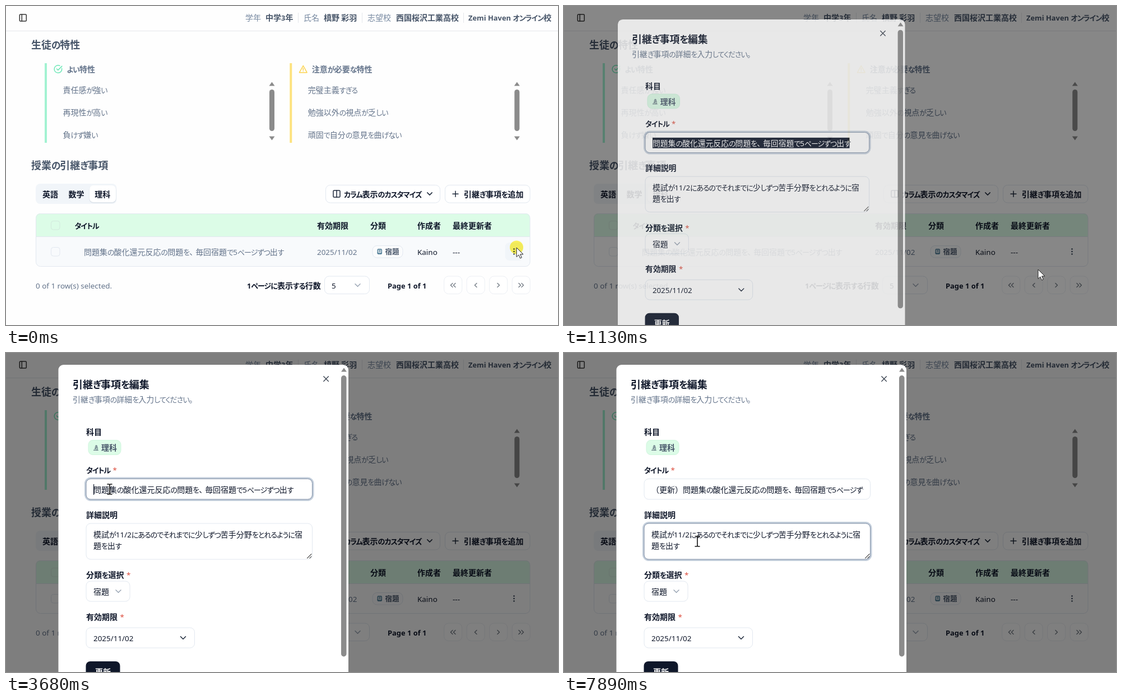
These frames come from a looping animation (985x569 px, 8 s). An HTML page:

```html
<!DOCTYPE html>
<html lang="ja">
<head>
<meta charset="utf-8">
<title>引継ぎ事項</title>
<style>
html, body { margin: 0; width: 100%; height: 100%; overflow: hidden; background: #fff; }
svg { display: block; width: 985px; height: 569px; }
text { white-space: pre; font-family: "Noto Sans CJK JP", "Noto Sans CJK", "Noto Sans", sans-serif; }
.kana { font-size: .93em; letter-spacing: -.075em; font-feature-settings: "palt", "kern"; }
.stop { letter-spacing: -.22em; }
.latin { font-family: "Noto Sans", "Open Sans", sans-serif; font-size: .96em; }
.bold .latin { font-size: .92em; }
</style>
</head>
<body>
<svg id="stage" viewBox="0 0 985 569" xml:space="preserve"></svg>
<script>
const LOOP = 8000;
const INK = '#0f172a', SLATE = '#64748b', DARK = '#475569', LINE = '#e2e8f0', MINT = '#dcfce7', BAR = '#8b8b8b';
const stage = document.getElementById('stage');

function el(tag, attrs, parent) {
  const node = document.createElementNS('http://www.w3.org/2000/svg', tag);
  for (const k in attrs) node.setAttribute(k, attrs[k]);
  parent.appendChild(node);
  return node;
}
const group = (parent, attrs = {}) => el('g', attrs, parent);
const show = (node, on) => node.setAttribute('display', on ? 'inline' : 'none');

// x1..y2 are the outer edges of the box
function box(g, x1, y1, x2, y2, r, fill, stroke, width = 1) {
  const o = stroke ? width / 2 : 0;
  return el('rect', {
    x: x1 + o, y: y1 + o, width: x2 - x1 - 2 * o, height: y2 - y1 - 2 * o, rx: r,
    fill: fill || 'none', stroke: stroke || 'none', 'stroke-width': width
  }, g);
}
function line(g, d, stroke, width = 1.4) {
  return el('path', {
    d, stroke, 'stroke-width': width, fill: 'none',
    'stroke-linecap': 'round', 'stroke-linejoin': 'round'
  }, g);
}
// cy is the middle of the line of text
function label(g, x, cy, str, fill = INK, bold = false, size = 14) {
  const t = el('text', { x, y: cy + size * .38, fill, 'font-size': size, 'font-weight': bold ? 600 : 400 }, g);
  if (bold) t.setAttribute('class', 'bold');
  for (const run of str.match(/[ぁ-ゖァ-ヺー]+|[、。]|[ -~]+|[^ぁ-ゖァ-ヺー、。 -~]+/g)) {
    const kind = /[ぁ-ゖァ-ヺー]/.test(run) ? 'kana' : /[、。]/.test(run) ? 'stop' : /[ -~]/.test(run) ? 'latin' : 'kanji';
    el('tspan', { class: kind }, t).textContent = run;
  }
  return t;
}
const chevron = (g, x, y, stroke, r = 4) => line(g, `M${x - r} ${y - r / 2}l${r} ${r}l${r} ${-r}`, stroke, 1.5);
const triangle = (g, x, y, dir) =>
  el('path', { d: `M${x - 5} ${y + 3.5 * dir}h10l-5 ${-7 * dir}z`, fill: BAR }, g);
const columns = (g, x, y, mid, stroke) => {
  el('rect', { x: x - 6, y: y - 6, width: 12, height: 12, rx: 1.5, fill: 'none', stroke, 'stroke-width': 1.5 }, g);
  line(g, `M${x + mid} ${y - 6}v12`, stroke, 1.5);
};

/* ---------- page ---------- */
const page = group(stage);
box(page, 0, 0, 985, 569, 0, '#fefefe');
columns(page, 30.3, 21, -2, '#333');
el('path', { d: 'M0 44.5H985', stroke: '#e5e7eb' }, page);
[[427, '学年', 463, '中学3年'], [531, '氏名', 567, '槙野 彩羽'], [645, '志望校', 696, '西国桜沢工業高校']].forEach(([x, a, x2, b]) => {
  label(page, x, 21, a, '#7688a0');
  label(page, x2, 21, b, DARK, true);
});
label(page, 825, 21, 'Zemi Haven オンライン校', DARK, true);
[521.5, 635.5, 816.5].forEach(x => el('path', { d: `M${x} 12V30`, stroke: '#e5e7eb' }, page));

label(page, 45, 69, '生徒の特性', DARK, true, 18);
function traits(x, color, title, items) {
  box(page, x, 102, x + 4, 244, 0, color);
  label(page, x + 39.5, 113, title, SLATE, true);
  items.forEach((s, i) => label(page, x + 32.5, 149.5 + i * 40.3, s, SLATE));
  box(page, x + 401, 149, x + 410, 223, 4.5, BAR);
  triangle(page, x + 405.5, 139, 1);
  triangle(page, x + 405.5, 236, -1);
}
traits(69, '#a3f2d2', 'よい特性', ['責任感が強い', '再現性が高い', '負けず嫌い']);
traits(506.3, '#fde27e', '注意が必要な特性', ['完璧主義すぎる', '勉強以外の視点が乏しい', '頑固で自分の意見を曲げない']);
line(page, 'M99.6 111.3a6.8 6.8 0 1 1-3.6-4.8M90.5 112l2.3 2.4l7-7', '#6ee7b7', 1.5);
line(page, 'M530.3 106.5l6.8 12.2h-13.6zM530.3 111v3.4M530.3 116.4v.2', '#fcd34d', 1.5);

label(page, 45, 284, '授業の引継ぎ事項', DARK, true, 18);
box(page, 53, 317, 197.5, 353, 8, '#f1f5f9');
box(page, 148.5, 321, 196.5, 351.5, 7, '#dde3ea');
box(page, 149, 320, 196, 350, 7, '#fff');
['英語', '数学', '理科'].forEach((s, i) => label(page, 65 + i * 46.6, 335.5, s, INK, true));

box(page, 570, 319, 775, 351.5, 8, '#fff', LINE);
columns(page, 590, 335, 0, '#1e293b');
label(page, 603, 335.5, 'カラム表示のカスタマイズ', INK, true);
chevron(page, 756, 335, '#1e293b', 4.2);
box(page, 783, 319, 935.5, 351.5, 8, '#fff', LINE);
line(page, 'M797 335.3h10M802 330.3v10', '#1e293b', 1.5);
label(page, 817, 335.5, '引継ぎ事項を追加', INK, true);

const rowHover = el('path', { d: 'M53.5 411H935V456q0 8-8 8H61.5q-8 0-8-8z', fill: '#f8fafc' }, page);
el('path', { d: 'M53.5 411V378q0-8 8-8H927q8 0 8 8V411z', fill: MINT }, page);
el('path', { d: 'M53.5 411.5H935', stroke: LINE }, page);
box(page, 53, 370, 935.5, 465, 8, null, LINE);
box(page, 80, 383, 96.5, 399.5, 4, null, '#d3e9dd');
box(page, 80, 430, 96.5, 446.5, 4, null, LINE);
[[122.5, 'タイトル'], [555, '有効期限'], [650, '分類'], [734, '作成者'], [797, '最終更新者']]
  .forEach(([x, s]) => label(page, x, 391.5, s, INK, true));
const TITLE = '問題集の酸化還元反応の問題を、毎回宿題で5ページずつ出す';
label(page, 139, 438.5, TITLE, SLATE);
label(page, 555, 438.5, '2025/11/02', SLATE);
box(page, 653.5, 427, 708.5, 449.5, 8, '#fbfcfd', LINE);
box(page, 662.5, 433, 671, 443, 1.5, null, '#4b7a94', 1.4);
line(page, 'M663 440.6h7.5M665.3 435.8h3M665.3 437.9h3', '#4b7a94', 1.2);
label(page, 676.5, 438.5, '宿題', DARK, true, 12.5);
label(page, 734, 438.5, 'Kaino');
label(page, 797, 438.5, '---');
const dotHover = box(page, 890.5, 422, 922.5, 454, 8, '#f1f5f9');
[433.5, 438, 442.5].forEach(cy => el('circle', { cx: 906.5, cy, r: 1.3, fill: '#334155' }, page));

label(page, 53, 498.5, '0 of 1 row(s) selected.', SLATE);
label(page, 430, 498.5, '1ページに表示する行数', INK, true);
box(page, 568, 481.5, 649, 514, 8, '#fff', LINE);
label(page, 581, 498.5, '5');
chevron(page, 627.5, 498, '#9aa5b4', 4.5);
label(page, 681, 498.5, 'Page 1 of 1', INK, true);
[[-1, 2], [-1, 1], [1, 1], [1, 2]].forEach(([dir, n], i) => {
  const x = 797.7 + i * 40.5;
  box(page, x - 16.5, 481.5, x + 16.5, 514, 8, '#fff', '#eceff4');
  for (let k = 0; k < n; k++) {
    const tip = x + dir * 1.8 + (n > 1 ? (k ? 2.5 : -2.5) : 0);
    line(page, `M${tip - dir * 3.6} 494.4l${dir * 3.6} 3.6l${-dir * 3.6} 3.6`, '#777f88', 1.4);
  }
});

/* ---------- row menu ---------- */
const menu = group(stage);
box(menu, 793, 458.5, 923, 542, 8, '#00000012');
box(menu, 794, 458, 922, 539, 7, '#fff', LINE);
box(menu, 799, 463, 917, 494, 5, '#f1f5f9');
label(menu, 807, 478.5, '編集');
el('path', { d: 'M795 498.5H921', stroke: LINE }, menu);
label(menu, 807, 518.5, '削除');

/* ---------- dialog ---------- */
const shade = box(stage, 0, 0, 985, 569, 0, '#000');
const dialog = group(stage);
box(dialog, 93.5, 21, 611, 621, 9, '#fff');
triangle(dialog, 603, 30, 1);
box(dialog, 598, 40, 607.5, 541.5, 4.7, BAR);
line(dialog, 'M566.8 41.8l8.6 8.6M575.4 41.8l-8.6 8.6', '#3f4754', 1.4);
label(dialog, 119, 56.5, '引継ぎ事項を編集', INK, true, 18);
label(dialog, 119, 83, '引継ぎ事項の詳細を入力してください。', SLATE);

[[141, '科目'], [209, 'タイトル', 190.5], [288.5, '詳細説明'], [396, '分類を選択', 215], [470.5, '有効期限', 203.5]].forEach(([y, s, star]) => {
  label(dialog, 143, y, s, INK, true);
  if (star) label(dialog, star, y, '*', '#dc4a3a');
});
box(dialog, 146.5, 155, 205.5, 182, 8, MINT, '#d0f5de');
line(dialog, 'M156.5 173.3h8M158 171h3M162 173a3.6 3.6 0 0 0 0-6M159.2 168.8l1.2-4l2 .6l-1.2 4z', DARK, 1);
label(dialog, 170, 169, '理科', DARK, true);

function field(y1, y2) {
  box(dialog, 142.5, y1, 547, y2, 8, '#fff', LINE);
  const ring = group(dialog);
  box(ring, 140, y1 - 2.5, 549.5, y2 + 2.5, 10, null, '#c3cedb', 3);
  box(ring, 142.5, y1, 547, y2, 8, null, '#8593a8');
  return ring;
}
const titleRing = field(224, 261.5);
const noteRing = field(303.5, 368.5);

const defs = el('defs', {}, stage);
const clip = id => el('rect', { x: 156, y: 226, width: 378, height: 34 }, el('clipPath', { id }, defs));
clip('inner');
const selClip = clip('selected');
const input = group(dialog, { 'clip-path': 'url(#inner)' });
const texts = ['', '（更新）'].map(prefix => {
  const g = group(input);
  label(g, 156, 243.5, prefix + TITLE);
  return g;
});
const selBox = box(input, 156, 234, 511, 253, 0, INK);
const selTexts = ['', '（更新）'].map(prefix => {
  const g = group(input, { 'clip-path': 'url(#selected)' });
  label(g, 156, 243.5, prefix + TITLE, '#fff');
  return g;
});
const caret = box(dialog, 156, 234, 157.2, 253, 0, INK);

label(dialog, 156, 323.5, '模試が11/2にあるのでそれまでに少しずつ苦手分野をとれるように宿');
label(dialog, 156, 343.5, '題を出す');
line(dialog, 'M537.5 366l7.5-7.5M541.8 366l3.2-3.2', '#555', 1.1);
box(dialog, 142.5, 406.5, 221.5, 443.5, 8, '#fff', LINE);
label(dialog, 156, 425.5, '宿題');
chevron(dialog, 200.5, 425, '#9aa5b4', 4.5);
box(dialog, 142.5, 489.5, 337, 526.5, 8, '#fff', LINE);
label(dialog, 156, 508.5, '2025/11/02');
chevron(dialog, 316, 508, '#1e293b', 4.5);
box(dialog, 142.5, 550, 203.5, 586, 8, INK);
label(dialog, 159, 568.5, '更新', '#fff', true);

/* ---------- pointer ---------- */
const glow = el('circle', { cx: 911, cy: 430.5, r: 12, fill: '#fff45c', style: 'mix-blend-mode: multiply' }, stage);
const pointer = group(stage);
const arrow = el('path', {
  d: 'M0 0V16.5L3.9 12.9L6.5 18.9L9.2 17.7L6.6 11.9H12Z',
  fill: '#fff', stroke: '#222', 'stroke-width': 1, 'stroke-linejoin': 'round'
}, pointer);
const beam = group(pointer);
const beamPath = 'M-4 -9h2.5q1.5 0 1.5 1.5v15q0 1.5 -1.5 1.5h-2.5M4 -9h-2.5q-1.5 0 -1.5 1.5M4 9h-2.5q-1.5 0 -1.5 -1.5';
line(beam, beamPath, '#111', 1.6);

/* ---------- motion ---------- */
const PATH = [
  [0, 911, 431], [200, 911, 431], [660, 853, 470], [990, 853, 470], [1060, 851, 470], [1130, 846, 470],
  [1680, 143, 264], [1750, 136, 250], [1820, 129, 237], [1960, 129, 237], [2580, 178, 243], [2740, 178, 243],
  [3200, 146, 238], [3420, 146, 238], [3540, 162, 241], [3680, 185, 243], [3800, 185, 243], [4030, 130, 247],
  [4150, 130, 247], [4510, 225, 243], [4880, 225, 243], [5600, 80, 233], [5799, 80, 233], [5800, 87, 231],
  [6270, 87, 231], [6330, 88, 270], [6680, 180, 331], [6900, 180, 331], [7080, 152, 331], [7250, 152, 331],
  [7620, 238, 336], [LOOP, 238, 336]
];
const clamp = v => Math.max(0, Math.min(1, v));
const smooth = v => v * v * (3 - 2 * v);
const within = (t, a, b) => t >= a && t < b;

function pointerAt(t) {
  let i = 1;
  while (PATH[i][0] < t) i++;
  const [t0, x0, y0] = PATH[i - 1], [t1, x1, y1] = PATH[i];
  const k = smooth(clamp((t - t0) / (t1 - t0)));
  return [x0 + (x1 - x0) * k, y0 + (y1 - y0) * k];
}
// cubic-bezier(.25, .1, .25, 1)
function ease(v) {
  const bez = (u, a, b) => 3 * u * (1 - u) ** 2 * a + 3 * u * u * (1 - u) * b + u ** 3;
  let lo = 0, hi = 1;
  for (let i = 0; i < 24; i++) {
    const mid = (lo + hi) / 2;
    if (bez(mid, .25, .25) < v) lo = mid; else hi = mid;
  }
  return bez(lo, .1, 1);
}

const SHOW = 990, CLICK = 3440, PASTE = 3960, DRAG = 4910, RELEASE = 5800, NOTE = 7650;

function draw(t) {
  show(glow, t < 200);
  show(rowHover, t < 60);
  show(dotHover, t < SHOW);
  const menuIn = t < 930 ? clamp((t - 60) / 140) : 1 - clamp((t - 930) / 70);
  menu.setAttribute('opacity', menuIn);

  shade.setAttribute('opacity', .5 * ease(clamp((t - SHOW) / 200)));
  const p = ease(clamp((t - SHOW) / 280));
  const s = .95 + .05 * p;
  show(dialog, p > 0);
  dialog.setAttribute('opacity', p);
  dialog.setAttribute('transform', `translate(352.25 321) scale(${s}) translate(-352.25 -321)`);

  const [x, y] = pointerAt(t);
  const pasted = t >= PASTE;
  texts.forEach((g, i) => show(g, i === +pasted));
  selTexts.forEach((g, i) => show(g, i === +pasted));

  let from = 156, to = 156;
  if (t < CLICK) to = 511;
  else if (within(t, DRAG, NOTE)) {
    to = 212;
    from = t < RELEASE ? Math.max(156, Math.min(212, 156 + 14 * Math.round((x - 156) / 14))) : 156;
  }
  for (const r of [selBox, selClip]) {
    r.setAttribute('x', from);
    r.setAttribute('width', to - from);
  }
  show(caret, within(t, CLICK, 4490) || within(t, 4890, DRAG));
  caret.setAttribute('x', pasted ? 212 : 156);
  const noteFocus = clamp((t - NOTE) / 120);
  titleRing.setAttribute('opacity', clamp((t - 1040) / 100) - noteFocus);
  noteRing.setAttribute('opacity', noteFocus);

  const overField = x > 143 && x < 547 && (within(y, 224, 262) || within(y, 304, 368));
  const typing = t > 1760 && (overField || within(t, DRAG, RELEASE));
  show(arrow, !typing);
  show(beam, typing);
  pointer.setAttribute('transform', `translate(${x} ${y})`);
}

function tick() {
  draw(performance.now() % LOOP);
  requestAnimationFrame(tick);
}
tick();
</script>
</body>
</html>
```
